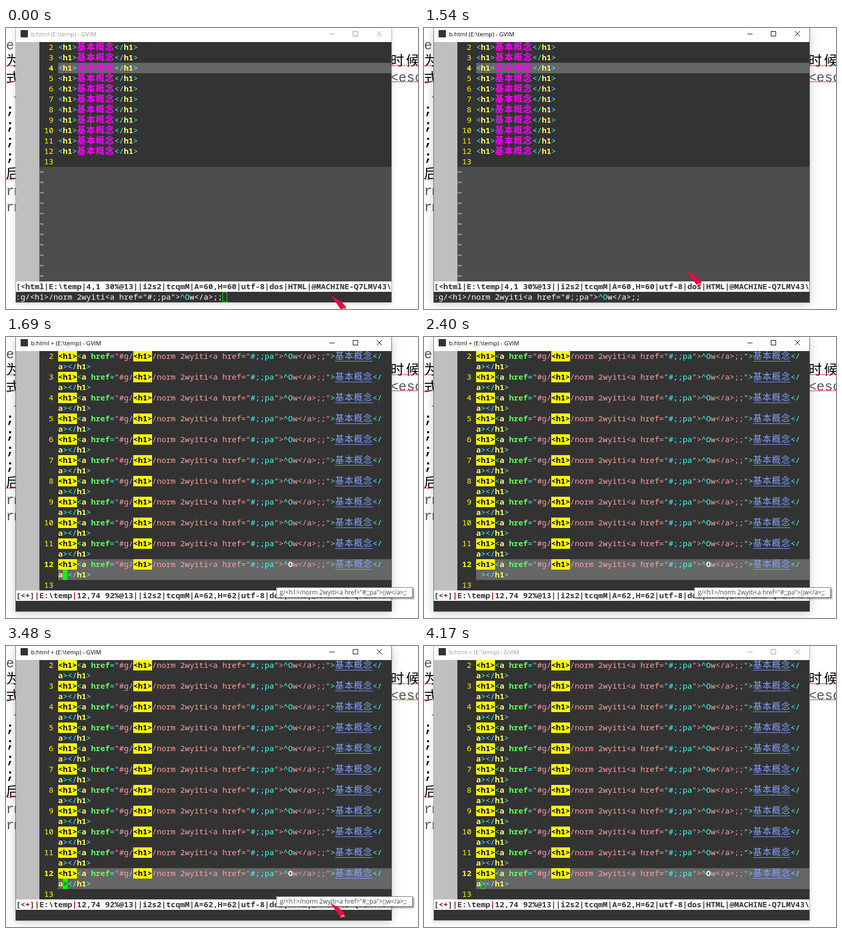
Write an HTML page with a canvas that moves like this. It is 790 by 540 pixels and loops after 4.25 s.

```html
<!DOCTYPE html>
<html lang="zh-CN">
<head>
<meta charset="utf-8">
<title>Editor macro</title>
<style>
  html, body { margin: 0; width: 100%; height: 100%; overflow: hidden; background: #fff; }
  canvas { display: block; }
</style>
</head>
<body>
<canvas id="stage" width="790" height="540"></canvas>
<script>
const ctx = document.getElementById('stage').getContext('2d');
const LOOP = 4250;
const LEFT = 19, TOP = 27, CELL_W = 9, CELL_H = 20, TEXT_COL = 9, STATUS_ROW = 23, COMMAND_ROW = 24;
const MONO = '"Noto Sans Mono", "DejaVu Sans Mono", monospace';
const CJK = '"Noto Sans CJK SC", "Noto Sans CJK", sans-serif';
const UI = '"Open Sans", "Noto Sans", sans-serif';
const DOC = '26px "Liberation Mono", monospace';
const DOC_CJK = `300 26px ${CJK}`;

const STYLES = {
  plain: { color: '#fff' },
  white: { color: '#fff', bold: true },
  tag: { color: '#40ffff' },
  name: { color: '#ffff60', bold: true },
  attr: { color: '#60ff60', bold: true },
  string: { color: '#ffa0a0' },
  heading: { color: '#ff00ff', bold: true },
  link: { color: '#80a0ff', underline: true },
  found: { color: '#000', bold: true, back: '#ff0' },
  number: { color: '#ff0' },
  current: { color: '#ff0', bold: true },
  filler: { color: '#add8e6', bold: true },
  status: { color: '#333', bold: true },
  alert: { color: '#a00000', bold: true },
  under: { color: '#000' }
};

const WORDS = '基本概念';
const HEADING = [['<', 'tag'], ['h1', 'name'], ['>', 'tag'], [WORDS, 'heading'],
  ['</', 'tag'], ['h1', 'name'], ['>', 'tag']];
const OPENING = [['<h1>', 'found'], ['<', 'tag'], ['a', 'name'], [' href', 'attr'], ['=', 'tag'],
  ['"#g/', 'string'], ['<h1>', 'found'], ['/norm 2wyiti<a href="', 'string'],
  ['#;;pa', 'tag'], ['">', 'string'], ['^O', 'tag']];
const LINKED = [...OPENING, ['w</a>;;"', 'string'], ['>', 'tag'], [WORDS, 'link'], ['</', 'tag']];
const WRAPPED = [['a', 'name'], ['></', 'tag'], ['h1', 'name'], ['>', 'tag']];
const COMMAND = [[':g/<h1>/norm 2wyiti<a href="#;;pa">', 'plain'], ['^O', 'tag'], ['w</a>;;', 'plain']];
const STATUS_END = '|utf-8|dos|HTML|@MACHINE-Q7LMV43\\';

// [start time, x, y]; without a position the pointer is hidden
const POINTER = [[0, 623, 514], [70, 548, 484], [150, 501, 462], [300, 502, 464], [370, 503, 466],
  [1620], [3330, 506, 467], [3410, 570, 481], [3480, 621, 493], [3560]];
const CURSOR = [[0, 'outline'], [150, 'on'], [300, 'off'], [450, 'on'], [850, 'off'], [1080, 'on'],
  [1540, 'off'], [1690, 'solid'], [1770, 'on'], [2400, 'off'], [2700, 'on'], [3100, 'off'],
  [3330, 'on'], [3710, 'off'], [3940, 'on'], [4170, 'outline']];

const latest = (track, t) => track.filter(step => step[0] <= t).pop();
const cellX = col => LEFT + col * CELL_W;
const rowY = row => TOP + row * CELL_H;

function rect(color, x, y, w, h) {
  ctx.fillStyle = color;
  ctx.fillRect(x, y, w, h);
}

function label(text, x, y, font, color) {
  ctx.font = font;
  ctx.fillStyle = color;
  ctx.fillText(text, x, y);
}

function line(color, points, width = 1) {
  ctx.strokeStyle = color;
  ctx.lineWidth = width;
  ctx.beginPath();
  points.forEach(([x, y]) => ctx.lineTo(x, y));
  ctx.stroke();
}

function put(col, row, segments) {
  const y = rowY(row);
  for (const [text, styleName] of segments) {
    const { color, bold, back, underline } = STYLES[styleName];
    const wide = text === WORDS;
    const cols = text.length * (wide ? 2 : 1);
    const x = cellX(col);
    const weight = bold ? 700 : 500;
    if (back) rect(back, x, y, cols * CELL_W, CELL_H);
    if (wide) {
      [...text].forEach((char, i) => label(char, x + i * 18, y + 15, `${weight} 17px ${CJK}`, color));
    } else {
      label(text, x, y + 15, `${weight} 15px ${MONO}`, color);
    }
    if (underline) rect(color, x, y + 19, cols * CELL_W, 1);
    col += cols;
  }
}

function numbered(row, number, segments = [], current = false) {
  put(5, row, [[String(number).padStart(3), current ? 'current' : 'number']]);
  put(TEXT_COL, row, segments);
}

function squiggle(x1, x2, y) {
  const points = [];
  for (let x = x1; x <= x2; x += 2) points.push([x, y + (x / 2 % 2 ? 1.5 : -1)]);
  line('#d83030', points);
}

function drawDocument() {
  rect('#fff', 0, 0, 790, 540);
  label('e', 0, 41, DOC, '#555');
  label('为', 0, 72, DOC_CJK, '#000');
  label('式', 0, 105, DOC_CJK, '#000');
  label('`', 10, 150, DOC, '#555');
  for (let y = 165; y <= 255; y += 30) label(';', 0, y, 'bold ' + DOC, '#000');
  label('后', 0, 289, DOC_CJK, '#000');
  label('rm', 0, 321, DOC, '#555');
  label('rm', 0, 352, DOC, '#555');
  label('时', 737, 72, DOC_CJK, '#000');
  label('候', 767, 72, DOC_CJK, '#000');
  label('<esc', 737, 103, DOC, '#555');
  for (const [x1, x2] of [[0, 18], [740, 790]]) {
    squiggle(x1, x2, 72);
    squiggle(x1, x2, 103);
  }
  squiggle(0, 18, 290);
}

function drawWindow(focused, modified) {
  ctx.save();
  ctx.shadowColor = focused ? 'rgba(0,0,0,.2)' : 'rgba(0,0,0,.14)';
  ctx.shadowBlur = focused ? 18 : 10;
  ctx.shadowOffsetY = 3;
  rect(focused ? '#666' : '#aaa', 18, -1, 722, 529);
  ctx.restore();
  rect('#fff', LEFT, 0, 720, TOP);
  rect('#333', 28, 4, 14, 14);
  const ink = focused ? '#000' : '#999';
  label(`b.html ${modified ? '+ ' : ''}(E:\\temp) - GVIM`, 48, 16, `11.5px ${UI}`, ink);
  rect(ink, 620, 11, 10, 1);
  ctx.strokeStyle = ink;
  ctx.lineWidth = 1;
  ctx.strokeRect(665.5, 6.5, 9, 9);
  line(ink, [[711, 6], [721, 16]]);
  line(ink, [[721, 6], [711, 16]]);
  rect('#333', LEFT, TOP, 720, 500);
  rect('#bfbfbf', LEFT, TOP, 45, 460);
}

function fillBelow(row) {
  rect('#4d4d4d', 64, rowY(row), 675, (STATUS_ROW - row) * CELL_H);
  for (; row < STATUS_ROW; row++) put(5, row, [['~', 'filler']]);
}

function highlightLine(row, rows) {
  rect('#666', cellX(TEXT_COL), rowY(row), 639, rows * CELL_H);
}

function drawBefore() {
  highlightLine(2, 1);
  for (let n = 2; n <= 12; n++) numbered(n - 2, n, HEADING, n === 4);
  numbered(11, 13);
  fillBelow(12);
  put(0, COMMAND_ROW, COMMAND);
}

function drawDuring() {
  numbered(0, 1);
  for (let n = 2; n <= 5; n++) {
    numbered(2 * n - 3, n, LINKED);
    put(TEXT_COL, 2 * n - 2, WRAPPED);
  }
  numbered(9, 6, OPENING);
  numbered(10, 12, HEADING);
  numbered(11, 13);
  fillBelow(12);
}

function drawAfter(t) {
  highlightLine(20, 2);
  for (let n = 2; n <= 12; n++) {
    const row = 2 * n - 4;
    const missing = n === 12 && t >= 2400 && t < 2470;
    numbered(row, n, LINKED, n === 12);
    put(TEXT_COL, row + 1, missing ? [[' ', 'name'], ...WRAPPED.slice(1)] : WRAPPED);
  }
  rect('#666', cellX(58), rowY(20), CELL_W, CELL_H);
  put(58, 20, [['O', 'white']]);
  numbered(22, 13);
}

function drawStatus(modified) {
  rect('#fff', LEFT, rowY(STATUS_ROW), 720, CELL_H);
  put(0, STATUS_ROW, modified
    ? [['[<', 'status'], ['+', 'alert'], [']', 'status'], ['|', 'alert'], ['E:\\temp', 'status'],
       ['|', 'alert'], ['12,74 92%@13||i2s2|tcqmM|A=62,H=62' + STATUS_END, 'status']]
    : [['[<html|E:\\temp|4,1 30%@13||i2s2|tcqmM|A=60,H=60' + STATUS_END, 'status']]);
}

function drawCursor(col, row, state, char) {
  const x = cellX(col), y = rowY(row);
  if (state === 'outline') {
    ctx.strokeStyle = '#0f0';
    ctx.lineWidth = 1;
    ctx.strokeRect(x + .5, y + .5, CELL_W - 1, CELL_H - 1);
  } else if (state !== 'off') {
    rect('#0f0', x, y, CELL_W, CELL_H);
    if (state === 'on') put(col, row, [[char, 'under']]);
  }
}

function drawTooltip() {
  ctx.save();
  ctx.shadowColor = 'rgba(0,0,0,.5)';
  ctx.shadowBlur = 3;
  ctx.shadowOffsetX = ctx.shadowOffsetY = 2;
  rect('#767676', 518, 481, 262, 20);
  ctx.restore();
  rect('#fff', 519, 482, 260, 18);
  label('g/<h1>/norm 2wyiti<a href="#;;pa">▯w</a>;;', 525, 495, `11.8px ${UI}`, '#444');
}

function drawPointer(x, y) {
  ctx.save();
  ctx.translate(x, y);
  ctx.fillStyle = '#f5053f';
  ctx.fill(new Path2D('M0 0L20 12L29 22L28 28L21 29L13 18Z'));
  line('#8c1030', [[14, 19], [21, 28]]);
  line('#fff', [[21, 28], [25, 25], [28, 27]], 1.5);
  ctx.restore();
}

function draw(t) {
  const focused = t >= 150 && t < 4170;
  const modified = t >= 1690;
  const cursor = latest(CURSOR, t)[1];
  drawDocument();
  drawWindow(focused, modified);
  if (t < 1620) drawBefore();
  else if (t < 1690) drawDuring();
  else drawAfter(t);
  drawStatus(modified);
  if (t < 1620) drawCursor(44, COMMAND_ROW, cursor, ' ');
  else if (modified) drawCursor(10, 21, cursor, '>');
  if (t >= 1620 && t < 3560) drawTooltip();
  const [, x, y] = latest(POINTER, t);
  if (x !== undefined) drawPointer(x, y);
}

const start = performance.now();
function tick() {
  draw((performance.now() - start) % LOOP);
  requestAnimationFrame(tick);
}
tick();
</script>
</body>
</html>
```
